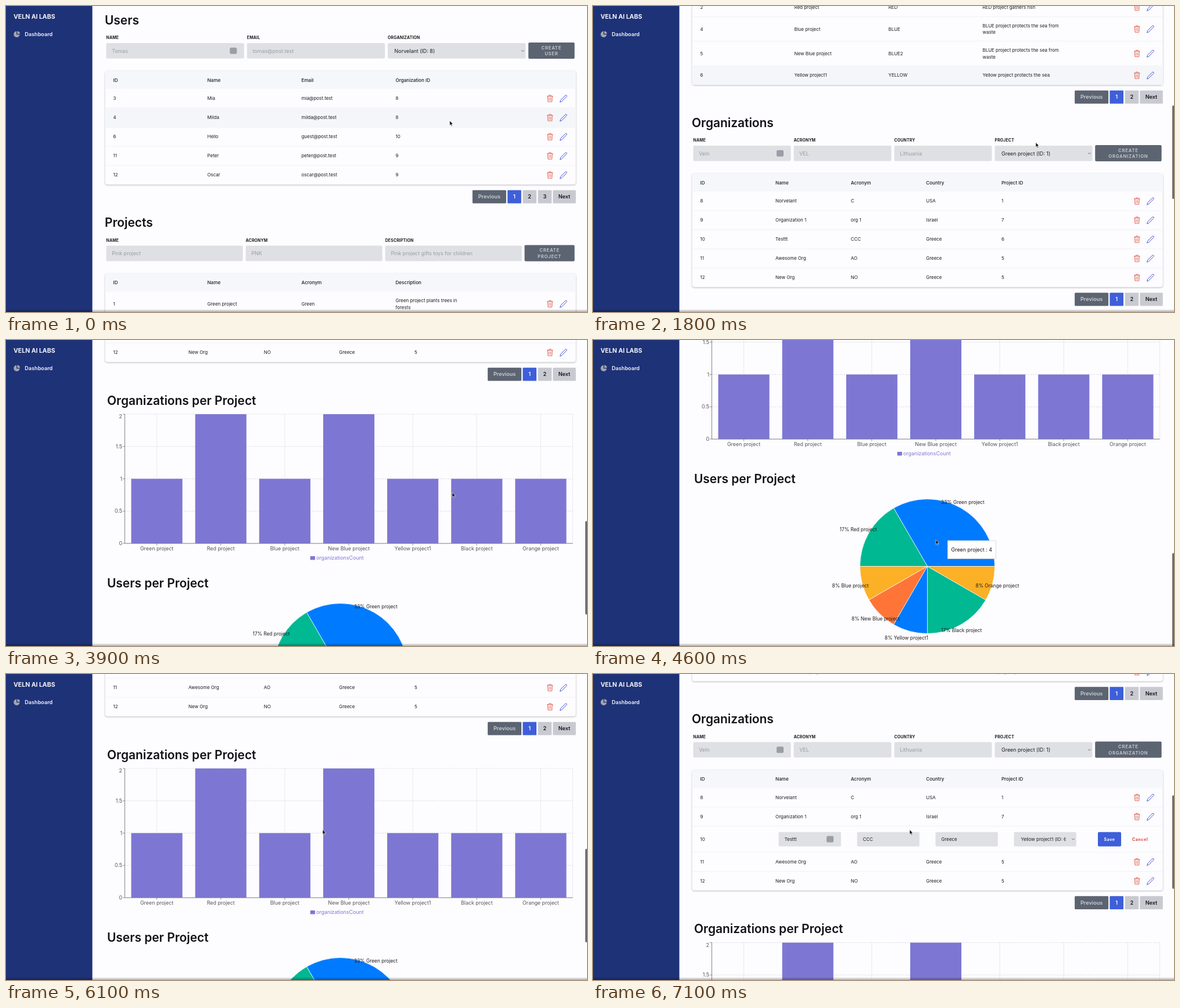
Animation, 1000 px wide and 528 px high, one loop 7200 ms. Source, as an HTML page:

```html
<!DOCTYPE html>
<html lang="en">
<head>
<meta charset="utf-8">
<title>Dashboard</title>
<style>
html, body { margin: 0; width: 100%; height: 100%; overflow: hidden; background: #fdfcfe; }
svg { display: block; }
#stage { width: 100vw; height: 100vh; }
text { font-family: Inter, "Open Sans", sans-serif; font-optical-sizing: none; fill: #1b1c21; white-space: pre; }
.h { font-size: 20.9px; font-weight: 600; fill: #111217; }
.label { font-size: 6.9px; font-weight: 700; letter-spacing: .025em; }
.th { font-size: 8.1px; font-weight: 500; }
.td { font-size: 7.95px; }
.hint { font-size: 8.9px; fill: #9a9ca4; }
.value { font-size: 8.95px; }
.button { font-size: 7.7px; font-weight: 600; letter-spacing: .1em; fill: #c9ccd2; }
.page { font-size: 9.15px; font-weight: 600; fill: #17181c; }
.small { font-size: 7px; font-weight: 700; letter-spacing: .08em; }
.tick { font-size: 8.9px; fill: #55565c; }
.slice { font-size: 8.4px; fill: #1d1d20; }
.card { fill: #fdfcfe; stroke: #e7e8ed; stroke-width: .6; filter: drop-shadow(0 1.2px 1.2px rgba(0,0,0,.24)); }
.field { fill: #dfe0e4; }
.line { fill: none; stroke-linecap: round; stroke-linejoin: round; }
</style>
</head>
<body>
<svg id="stage" viewBox="0 0 1000 528" preserveAspectRatio="none"></svg>
<script>
const LOOP = 7200, STEP = 100, EDIT_GROW = 12;
const GREY = '#5c6471', BLUE = '#3e5fd9', BAR = '#7d77d3';

const sizes = { h: 20.9, label: 6.9, th: 8.1, td: 7.95, hint: 8.9, value: 8.95, button: 7.7, page: 9.15, small: 7, tick: 8.9, slice: 8.4 };

// y is the middle of the capital letters
const text = (x, y, str, cls, extra = '') =>
  `<text x="${x}" y="${y + sizes[cls] * .36}" class="${cls}" ${extra}>${str}</text>`;
const mid = 'text-anchor="middle"';
const rect = (x, y, w, h, fill, r = 0, extra = '') =>
  `<rect x="${x}" y="${y}" width="${w}" height="${h}" rx="${r}" fill="${fill}" ${extra}/>`;
const line = (x1, y1, x2, y2, stroke, extra = '') =>
  `<path d="M${x1} ${y1}L${x2} ${y2}" stroke="${stroke}" ${extra}/>`;
const field = (x, y, w, h) => `<rect class="field" x="${x}" y="${y}" width="${w}" height="${h}" rx="2"/>`;
const chevron = (x, y) => `<path class="line" d="M${x - 2} ${y - 1}l2 2l2-2" stroke="#55575e" stroke-width=".9"/>`;
const badge = (x, y, id = '') => rect(x - 6, y - 5.5, 12, 11, '#9c9ea6', 2, id);

const icons = y => `
  <path class="line" transform="translate(936.3 ${y})" stroke="#e0604f" stroke-width=".95"
    d="M-4.8-3.8H4.8M-1.9-3.8V-5.6H1.9V-3.8M-4-3.8L-3.4 5.6H3.4L4-3.8M-1.3-1.4V3.3M1.3-1.4V3.3"/>
  <path class="line" transform="translate(959.5 ${y})" stroke="#4350d2" stroke-width=".95"
    d="M-5.8 6L-4.8 2.7L3.4-5.4Q4.5-6.2 5.4-5.3T5.3-3.3L-2.6 4.8Z"/>`;

function pager(y, pages) {
  const start = 941 - pages * 26.2;
  let out = rect(start - 59.5, y - 11.4, 58, 22.8, GREY, 1.5) +
    text(start - 30.5, y, 'Previous', 'page', mid + ' style="fill:#c9ccd2"');
  for (let i = 0; i < pages; i++) {
    const x = start + i * 26.2 + .8;
    out += rect(x, y - 11.4, 23.6, 22.8, i ? '#c9cad1' : BLUE, 1) +
      text(x + 11.8, y, i + 1, 'page', mid + (i ? '' : ' style="fill:#fff"'));
  }
  return out + rect(941.3, y - 11.4, 39.5, 22.8, '#c9cad1', 1.5) + text(961, y, 'Next', 'page', mid);
}

function form(y, f) {
  let out = '';
  f.fields.forEach(([label, hint, kind], i) => {
    const x = 172.5 + i * f.pitch, w = f.pitch - 5;
    out += text(x, y + 30.6, label, 'label') + field(x, y + 40, w, 26.6);
    out += kind === 'select'
      ? text(x + 11.5, y + 53.6, hint, 'value') + chevron(x + w - 5, y + 53.5)
      : text(x + 9.7, y + 53.4, hint, 'hint');
    if (kind === 'badge') out += badge(x + w - 18.5, y + 53.3);
  });
  const bx = 172.5 + f.fields.length * f.pitch - .3, c = (bx + 978.6) / 2;
  return out + rect(bx, y + 39, 978.6 - bx, 28, GREY, 2) +
    text(c, y + 48, 'CREATE', 'button', mid) + text(c, y + 58.4, f.what, 'button', mid);
}

function editRow(y, cells) {
  let out = text(184.5, y, cells[0], 'td');
  for (let i = 1; i < 5; i++) {
    const x = 184.5 + 135 * i;
    out += field(x, y - 12.4, 107.3, 24.8);
    out += i < 4 ? text(x + 10, y, cells[i], 'td')
      : `<svg x="${x + 12}" y="${y - 10}" width="77" height="20">${text(0, 10, 'Yellow project1 (ID: 6)', 'td')}</svg>` + chevron(x + 102, y);
  }
  return out + badge(408, y, 'id="rowBadge"') + rect(869, y - 12.4, 40, 24.8, BLUE, 2) +
    text(889, y, 'Save', 'small', mid + ' style="fill:#fff"') +
    text(928, y, 'Cancel', 'small', 'style="fill:#d8463c"');
}

function section(y, s, editing = false) {
  const top = y + 88, pitch = 648 / (s.head.length);
  const heights = s.rows.map(r => editing && r[0] === 10 ? 33 + EDIT_GROW : String(r).includes('|') ? 42.3 : 33);
  const bottom = heights.reduce((a, b) => a + b, top + 31.1);
  let out = text(170, y, s.title, 'h') + form(y, s.form) +
    `<rect class="card" x="170.5" y="${top}" width="810.3" height="${bottom - top}" rx="4"/>` +
    `<path d="M170.5 ${top + 31.1}V${top + 4}q0-4 4-4H976.8q4 0 4 4V${top + 31.1}Z" fill="#f5f7fa"/>`;
  s.head.forEach((t, i) => out += text(184.5 + i * pitch, top + 15.6, t, 'th'));
  let ry = top + 31.1;
  s.rows.forEach((cells, n) => {
    const h = heights[n], c = ry + h / 2;
    if (n) out += line(170.5, ry, 980.8, ry, '#eef0f3', 'stroke-width=".8"');
    if (cells[0] === s.hover && !editing) out += rect(170.5, ry, 810.3, h, '#f4f6f9', 0, `id="hover${s.title}"`);
    if (editing && cells[0] === 10) out += editRow(c, cells);
    else {
      cells.forEach((t, i) => {
        const parts = String(t).split('|');
        parts.forEach((p, k) => out += text(184.5 + i * pitch, c + (k - (parts.length - 1) / 2) * 11.7, p, 'td'));
      });
      out += icons(c);
    }
    ry += h;
  });
  return out + pager(bottom + 21, s.pages);
}

const users = {
  title: 'Users', pages: 3, hover: 4, head: ['ID', 'Name', 'Email', 'Organization ID'],
  form: { pitch: 242.3, what: 'USER', fields: [['NAME', 'Tomas', 'badge'], ['EMAIL', 'tomas@post.test'], ['ORGANIZATION', 'Norvelant (ID: 8)', 'select']] },
  rows: [[3, 'Mia', 8], [4, 'Milda', 8], [6, 'Hello', 10], [11, 'Peter', 9], [12, 'Oscar', 9]]
    .map(([id, name, org]) => [id, name, (name === 'Hello' ? 'guest' : name.toLowerCase()) + '@post.test', org])
};
const sea = 'BLUE project protects the sea from|waste';
const projects = {
  title: 'Projects', pages: 2, hover: 6, head: ['ID', 'Name', 'Acronym', 'Description'],
  form: { pitch: 240.1, what: 'PROJECT', fields: [['NAME', 'Pink project'], ['ACRONYM', 'PNK'], ['DESCRIPTION', 'Pink project gifts toys for children']] },
  rows: [
    [1, 'Green project', 'Green', 'Green project plants trees in|forests'],
    [2, 'Red project', 'RED', 'RED project gathers fish'],
    [4, 'Blue project', 'BLUE', sea],
    [5, 'New Blue project', 'BLUE2', sea],
    [6, 'Yellow project1', 'YELLOW', 'Yellow project protects the sea']]
};
const orgs = {
  title: 'Organizations', pages: 2, hover: 10, head: ['ID', 'Name', 'Acronym', 'Country', 'Project ID'],
  form: { pitch: 173, what: 'ORGANIZATION', fields: [['NAME', 'Veln', 'badge'], ['ACRONYM', 'VEL'], ['COUNTRY', 'Lithuania'], ['PROJECT', 'Green project (ID: 1)', 'select']] },
  rows: [
    [8, 'Norvelant', 'C', 'USA', 1],
    [9, 'Organization 1', 'org 1', 'Israel', 7],
    [10, 'Testtt', 'CCC', 'Greece', 6],
    [11, 'Awesome Org', 'AO', 'Greece', 5],
    [12, 'New Org', 'NO', 'Greece', 5]]
};

// name, organizations, users, pie label x, pie label y offset
const stats = [
  ['Green project', 1, 4, 599, -110.5], ['Red project', 2, 2, 424.5, -63.5], ['Blue project', 1, 1, 411.5, 33],
  ['New Blue project', 2, 1, 445, 90.5], ['Yellow project1', 1, 1, 502, 123.5], ['Black project', 1, 2, 599, 110.5],
  ['Orange project', 1, 1, 658.5, 33]];
const colors = ['#007bff', '#00b892', '#fcb025', '#ff7538'];

function barChart() {
  const x0 = 204.5, x1 = 975.5, base = 1359.5, unit = 111.5, band = (x1 - x0) / 7, top = base - 2 * unit;
  const dash = 'stroke-width=".8" stroke-dasharray="1.75 1.75"';
  let out = text(174, 1112.5, 'Organizations per Project', 'h');
  for (let v = 0; v <= 2; v += .5) {
    const y = base - v * unit;
    out += line(x0, y, x1, y, '#cfcfd4', dash) + line(x0 - 3.5, y, x0, y, '#77777c', 'stroke-width=".8"') +
      text(200, v === 2 ? y + 4 : y, v, 'tick', 'text-anchor="end"');
  }
  out += line(x1, top, x1, base, '#cfcfd4', dash);
  stats.forEach(([name, n], i) => {
    const c = x0 + band * (i + .5);
    out += line(c, top, c, base, '#cfcfd4', dash) +
      rect(c - band * .4, base - n * unit, band * .8, n * unit, BAR) +
      line(c, base, c, base + 3.5, '#77777c', 'stroke-width=".8"') + text(c, base + 8.6, name, 'tick', mid);
  });
  return out + line(x0, top, x0, base, '#77777c', 'stroke-width=".9"') + line(x0, base, x1, base, '#77777c', 'stroke-width=".9"') +
    rect(523.7, base + 22, 8.2, 6.4, BAR) + text(534, base + 25, 'organizationsCount', 'tick', `style="fill:${BAR}"`);
}

const CX = 575.5, CY = 1579, R = 116, TOTAL = 12;
const polar = (a, r) => [CX + r * Math.cos(a), CY - r * Math.sin(a)];
let turn = 0;
const slices = stats.map(([name, , n]) => {
  const from = turn;
  turn += n / TOTAL * 2 * Math.PI;
  return { name, n, from, to: turn };
});
const pieChart = () => text(174, 1427.5, 'Users per Project', 'h') +
  slices.map((s, i) => `<path d="M${CX} ${CY}L${polar(s.from, R)}A${R} ${R} 0 0 0 ${polar(s.to, R)}Z" fill="${colors[i % 4]}" stroke="#fff" stroke-width=".7"/>`).join('') +
  stats.map(([name, , n, x, dy]) => text(x, CY + dy, `${Math.round(n / TOTAL * 100)}% ${name}`, 'slice')).join('') +
  `<g id="tip">${rect(0, 0, 83, 31.4, '#fff', 0, 'id="tipBox" stroke="#ccc" stroke-width=".7"')}${text(6.3, 15.8, '', 'tick', 'id="tipText" style="fill:#111"')}</g>`;

const stage = document.getElementById('stage');
stage.innerHTML = `
  <defs><linearGradient id="edge" x2="0" y2="1"><stop stop-color="#000" stop-opacity="0"/><stop offset="1" stop-color="#000" stop-opacity=".32"/></linearGradient></defs>
  ${rect(0, 0, 1000, 528, '#fdfcfe')}
  <g id="doc">
    ${section(24, users)}${section(373.6, projects)}
    <g id="view">${section(750.5, orgs)}</g><g id="edit">${section(750.5, orgs, true)}</g>
    <g id="charts">${barChart()}${pieChart()}</g>
  </g>
  ${rect(0, 0, 148.6, 528, '#1e3278')}
  <text x="13" y="21.6" style="font-size:10.5px;font-weight:700;fill:#f4f5fa">VELN AI LABS</text>
  <path d="M18 43.6A5.2 5.2 0 1 0 23.6 49.3H18Z" fill="#a3a5ab"/><path d="M19.3 43.2A5 5 0 0 1 24 47.9H19.3Z" fill="#a3a5ab"/>
  <text x="32.3" y="52.2" style="font-size:9.1px;font-weight:600;fill:#f4f5fa">Dashboard</text>
  ${rect(997, 0, 4, 161, '#6c6c70', 1.5, 'id="bar"')}
  ${rect(0, 523, 1000, 5, 'url(#edge)')}
  <path id="arrow" d="M0 0V8L1.8 6.4L3.1 9.3L4.5 8.7L3.2 5.8L5.6 5.6Z" fill="#111" stroke="#fff" stroke-width=".6"/>
  <path id="hand" d="M-2-5.2q.9-.8 1.6.2V-1.6L3.4-.9Q4.7-.5 4.5 1L3.8 5.2H-1.4L-4.2 1.2Q-4-.3-2 1Z" fill="#fff" stroke="#222" stroke-width=".8"/>`;

const el = id => document.getElementById(id);
const show = (id, on) => el(id).setAttribute('visibility', on ? 'inherit' : 'hidden');
const move = (id, x, y) => el(id).setAttribute('transform', `translate(${x} ${y})`);

// time, scroll offset
const scrollKeys = [[0, 0], [200, 0], [1200, 354.5], [1500, 430], [1800, 549.5], [2200, 740], [2500, 802.5], [3500, 802.5],
  [4000, 1060], [4300, 1188.5], [5700, 1188.5], [6100, 973.5], [7100, 673]];
// time, pointer x, pointer y
const mouseKeys = [[0, 763.7, 198], [200, 763.7, 198], [900, 762, 235.5], [2400, 762, 235.5], [2800, 959, 151], [3100, 960, 156], [3500, 960, 156],
  [4000, 720, 290], [4400, 590, 344.7], [4700, 590, 344.7], [4900, 625, 440], [5100, 550, 465], [5300, 515, 350], [5500, 545, 268.7]];

function at(keys, t) {
  const i = keys.findIndex(k => k[0] > t);
  if (i < 0) return keys[keys.length - 1].slice(1);
  const a = keys[i - 1], b = keys[i], p = (t - a[0]) / (b[0] - a[0]);
  return a.slice(1).map((v, k) => v + (b[k + 1] - v) * p);
}
const within = (t, a, b) => t >= a && t < b;

function showTip(x, y) {
  const dx = x - CX, dy = CY - y, angle = (Math.atan2(dy, dx) + 2 * Math.PI) % (2 * Math.PI);
  const s = Math.hypot(dx, dy) < R && slices.find(s => angle < s.to);
  show('tip', !!s);
  if (!s) return;
  const [px, py] = polar((s.from + s.to) / 2, R / 2);
  move('tip', px + 5.8, py + 5.8);
  el('tipText').textContent = `${s.name} : ${s.n}`;
  el('tipBox').setAttribute('width', el('tipText').getComputedTextLength() + 12.8);
}

function draw(t) {
  const [scroll] = at(scrollKeys, t), [mx, my] = at(mouseKeys, t);
  const editing = t >= 3000, grow = editing ? 0 : -EDIT_GROW;
  move('doc', 0, -scroll);
  move('charts', 0, grow);
  show('view', !editing);
  show('edit', editing);
  show('rowBadge', t >= 3400);
  show('hoverUsers', t < 400);
  show('hoverProjects', within(t, 1400, 2200));
  show('hoverOrganizations', within(t, 2700, 3000));
  const hand = within(t, 2800, 3600);
  show('hand', hand);
  show('arrow', !hand);
  move(hand ? 'hand' : 'arrow', mx, my);
  move('bar', 0, 3 + scroll * .307);
  show('bar', within(t, 200, 2900) || within(t, 3500, 4800) || t >= 5700);
  if (within(t, 4300, 5700)) showTip(mx, my + scroll);
  else show('tip', false);
}

function tick() {
  draw(Math.floor(performance.now() % LOOP / STEP) * STEP);
  requestAnimationFrame(tick);
}
tick();
</script>
</body>
</html>
```
